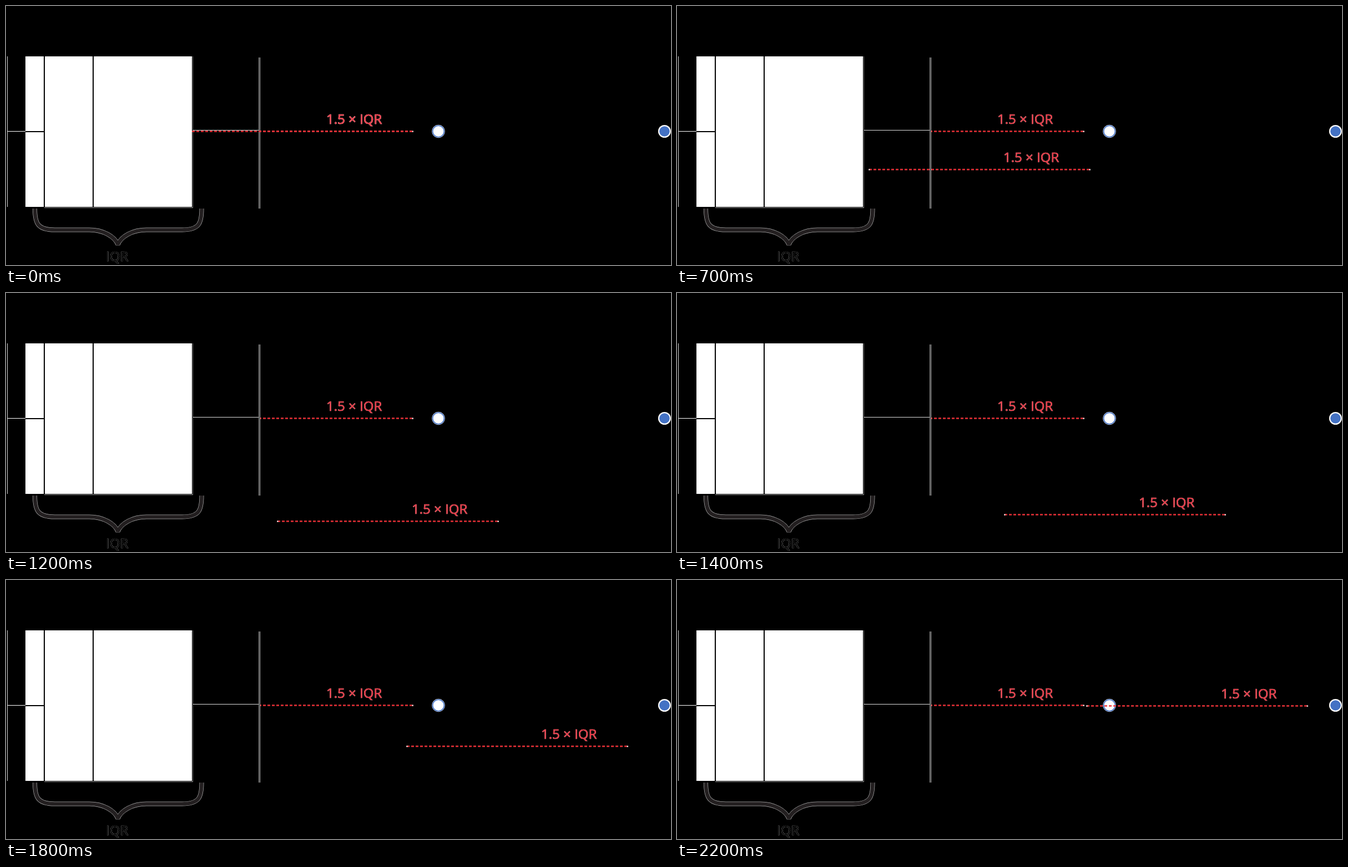
An HTML page for the animation above (3.2 s loop, 1198 by 468 pixels).

```html
<!DOCTYPE html>
<html lang="en">
<head>
<meta charset="utf-8">
<title>Box plot: 1.5 × IQR</title>
<style>
  html, body { margin: 0; width: 100%; height: 100%; overflow: hidden; background: #000; }
  svg { display: block; width: 1198px; height: 468px; }
  text { font: 24px "Open Sans", "Noto Sans", sans-serif; paint-order: stroke; stroke-width: .7px; }
  .red { fill: #ec3744; stroke: #f7a3a8; }
  .dark { fill: #000; stroke: #a5a5a5; }
  .fringe { stroke: #f4b0b2; stroke-width: 2.4; stroke-opacity: .55; }
  .dash { stroke: #ed1c24; stroke-width: 1.8; }
  .fringe, .dash { stroke-dasharray: 5 3; fill: none; }
  .crisp { shape-rendering: crispEdges; }
  .brace { fill: none; stroke-linejoin: bevel; }
</style>
</head>
<body>
<svg viewBox="0 0 1198 468">
  <defs>
    <path id="brace" d="M52 366C52 393 57 404.5 88 404.5H150C176 404.5 196 417 201.5 431
      C207 417 227 404.5 253 404.5H317C348 404.5 352.5 393 352.5 366"/>
  </defs>
  <rect width="1198" height="468"/>

  <g class="crisp" fill="#fff">
    <rect x="2" y="91" width="1" height="272" fill="#ddd"/>
    <rect x="3" y="226" width="32" height="1"/>
    <rect x="35" y="91" width="301" height="272"/>
    <rect x="69" y="364" width="268" height="1" fill="#999"/>
    <rect x="336" y="91" width="1" height="273" fill="#777"/>
    <rect x="337" y="224" width="119" height="1" fill="#ddd"/>
    <rect x="455" y="93" width="1" height="273" fill="#aaa"/>
    <rect x="457" y="93" width="1" height="273" fill="#ccc"/>
  </g>
  <g class="crisp" fill="#000">
    <rect x="35" y="226" width="34" height="2"/>
    <rect x="68" y="91" width="2" height="272"/>
    <rect x="156" y="91" width="2" height="272"/>
    <rect x="335" y="91" width="1" height="272"/>
  </g>

  <use href="#brace" class="brace" stroke="#b0b0b0" stroke-width="8"/>
  <use href="#brace" class="brace" stroke="#231f20" stroke-width="6.6"/>
  <text class="dark" x="180" y="461">IQR</text>

  <path class="fringe" d="M458 226.5H733" stroke-dashoffset="123"/>
  <path class="dash" d="M458 226.5H733" stroke-dashoffset="123"/>
  <rect x="731.5" y="225.5" width="2.4" height="2.4" fill="#f6dede"/>
  <text class="red" x="577" y="213">1.5 × IQR</text>

  <circle cx="779" cy="226.5" r="11.7" fill="#dfe6f4"/>
  <circle cx="779" cy="226.5" r="10.3" fill="#fff" stroke="#4472c4" stroke-width="1.6"/>
  <circle cx="1186.3" cy="226.5" r="11.5" fill="#fff"/>
  <circle cx="1186.3" cy="226.5" r="9.3" fill="#4472c4"/>

  <g id="ruler">
    <path class="fringe" d="M335 226.5H733"/>
    <path class="dash" d="M335 226.5H733"/>
    <g id="ends" fill="#f6dede">
      <rect x="334.2" y="225.5" width="2.4" height="2.4"/>
      <rect x="731.5" y="225.5" width="2.4" height="2.4"/>
    </g>
    <text class="red" x="577" y="213">1.5 × IQR</text>
  </g>
</svg>
<script>
  const LOOP = 3200, START = 500, STEP = 100, STEPS = 18, LEG = 3;
  // Offsets at the corners of the path, three steps apart
  const corners = [[0, 0], [10.5, 69], [65, 151], [199, 203], [366.5, 116], [397, 53], [403, 1]];
  const ruler = document.getElementById("ruler");
  const ends = document.getElementById("ends");

  function offsetAt(step) {
    const leg = Math.min(Math.floor(step / LEG), corners.length - 2);
    const part = step / LEG - leg;
    const from = corners[leg], to = corners[leg + 1];
    return from.map((v, i) => Math.round(v + (to[i] - v) * part));
  }

  function draw(ms) {
    const step = ms < START ? 0 : Math.min(STEPS, Math.floor((ms - START) / STEP) + 1);
    const [x, y] = offsetAt(step);
    ruler.setAttribute("transform", `translate(${x} ${y})`);
    ends.style.display = step ? "" : "none";
  }

  const begin = performance.now();
  function tick() {
    draw((performance.now() - begin) % LOOP);
    requestAnimationFrame(tick);
  }
  tick();
</script>
</body>
</html>
```
